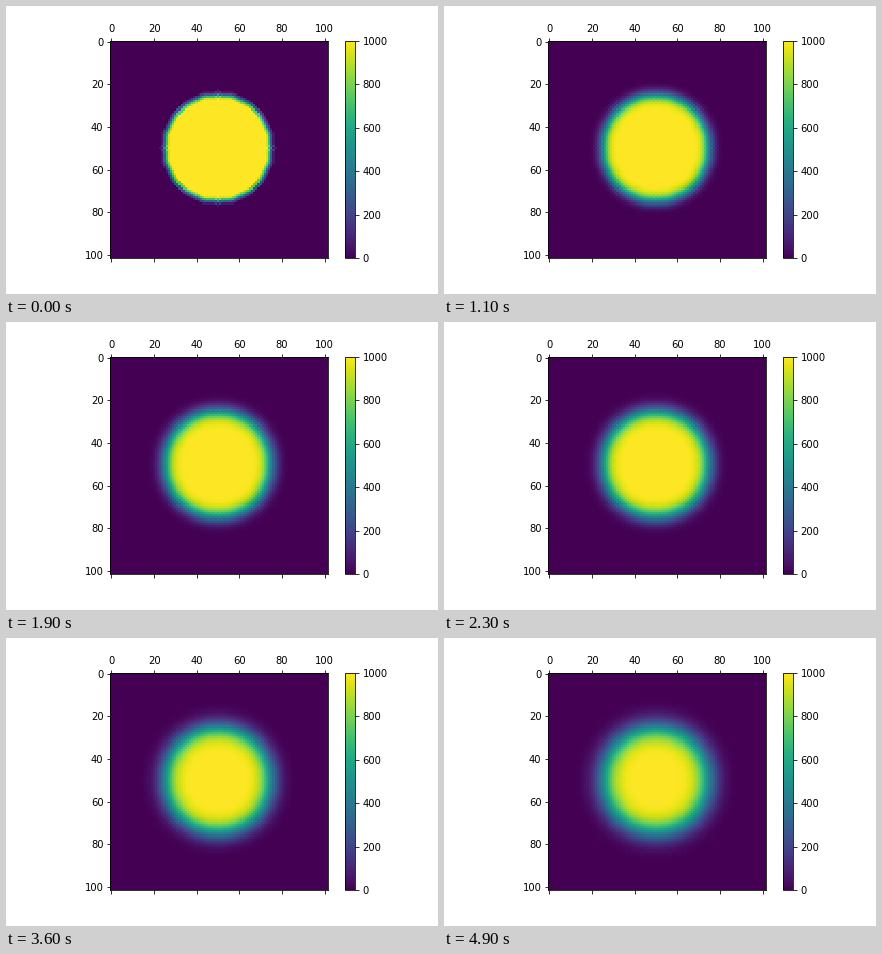
These frames come from a looping animation (432x288 px, 5 s). A matplotlib script:

```python
import numpy as np
import matplotlib.pyplot as plt
from matplotlib.animation import FuncAnimation

SIZE = 102
CENTER = 50
RADIUS = 25
HOT = 1000
FRAMES = 50
FIRST_STEP = 2
RATE = 0.25  # diffusivity * dt / dx^2

plt.rcParams.update({"font.family": "DejaVu Sans", "font.size": 10})


def diffuse(u):
    """One explicit step of the heat equation with cold borders."""
    new = u.copy()
    new[1:-1, 1:-1] += RATE * (
        u[2:, 1:-1] + u[:-2, 1:-1] + u[1:-1, 2:] + u[1:-1, :-2]
        - 4 * u[1:-1, 1:-1]
    )
    return new


def solve():
    y, x = np.mgrid[:SIZE, :SIZE]
    disc = (x - CENTER) ** 2 + (y - CENTER) ** 2 <= RADIUS ** 2
    states = [np.where(disc, float(HOT), 0.0)]
    for _ in range(FIRST_STEP + FRAMES - 1):
        states.append(diffuse(states[-1]))
    return states[FIRST_STEP:]


states = solve()

fig = plt.figure(figsize=(6, 4), dpi=72, facecolor="white")
fig.subplots_adjust(left=0.125, right=0.9, bottom=0.125, top=0.88)
ax = fig.add_subplot()
image = ax.matshow(states[0], cmap="viridis", vmin=0, vmax=HOT)
fig.colorbar(image, ax=ax)


def update(frame):
    image.set_data(states[frame])
    return [image]


anim = FuncAnimation(fig, update, frames=FRAMES, interval=100,
                     repeat=True, repeat_delay=0)
plt.show()
```
